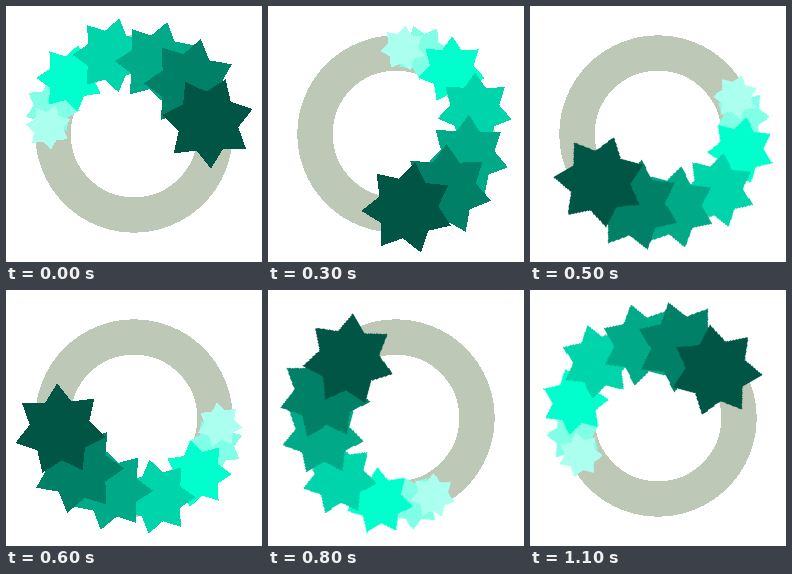
An HTML page that plays this animation: 256x256 px, repeating every 1200 ms.

```html
<!DOCTYPE html>
<html lang="en">
<head>
<meta charset="utf-8">
<title>Star spinner</title>
<style>
  html, body { margin: 0; width: 100%; height: 100%; overflow: hidden; background: #fff; }
  svg { display: block; width: 100vw; height: 100vh; shape-rendering: crispEdges; }
  #stars { animation: spin 1200ms steps(12, end) infinite; }
  @keyframes spin { to { transform: rotate(360deg); } }
</style>
</head>
<body>
<svg viewBox="-128 -128 256 256">
  <circle r="81" fill="none" stroke="#bec8b7" stroke-width="35.4"/>
  <g id="stars"></g>
</svg>
<script>
  // Back to front; angles in degrees.
  const stars = [
    { color: '#80ffe6', angle: -162, orbit: 86, size: 28, tilt: 6 },
    { color: '#aaffee', angle: -175.4, orbit: 86, size: 23, tilt: 32 },
    { color: '#00ffcc', angle: -138.8, orbit: 84.6, size: 34, tilt: 26.3 },
    { color: '#00d4aa', angle: -106.6, orbit: 82.2, size: 38, tilt: 26.3 },
    { color: '#00aa88', angle: -72.4, orbit: 75, size: 41.8, tilt: 27.5 },
    { color: '#008066', angle: -41.8, orbit: 75.1, size: 46.2, tilt: 26.3 },
    { color: '#005544', angle: -9, orbit: 75, size: 46.4, tilt: 35 }
  ];
  const TIPS = 7;
  const NOTCH = 0.66;

  function polar(radius, degrees) {
    const a = degrees * Math.PI / 180;
    return [radius * Math.cos(a), radius * Math.sin(a)];
  }

  function starPoints({ angle, orbit, size, tilt }) {
    const [cx, cy] = polar(orbit, angle);
    return Array.from({ length: TIPS * 2 }, (_, i) => {
      const [x, y] = polar(i % 2 ? size * NOTCH : size, tilt + i * 180 / TIPS);
      return `${(cx + x).toFixed(2)},${(cy + y).toFixed(2)}`;
    }).join(' ');
  }

  const group = document.getElementById('stars');
  for (const star of stars) {
    const shape = document.createElementNS('http://www.w3.org/2000/svg', 'polygon');
    shape.setAttribute('points', starPoints(star));
    shape.setAttribute('fill', star.color);
    group.append(shape);
  }
</script>
</body>
</html>
```
